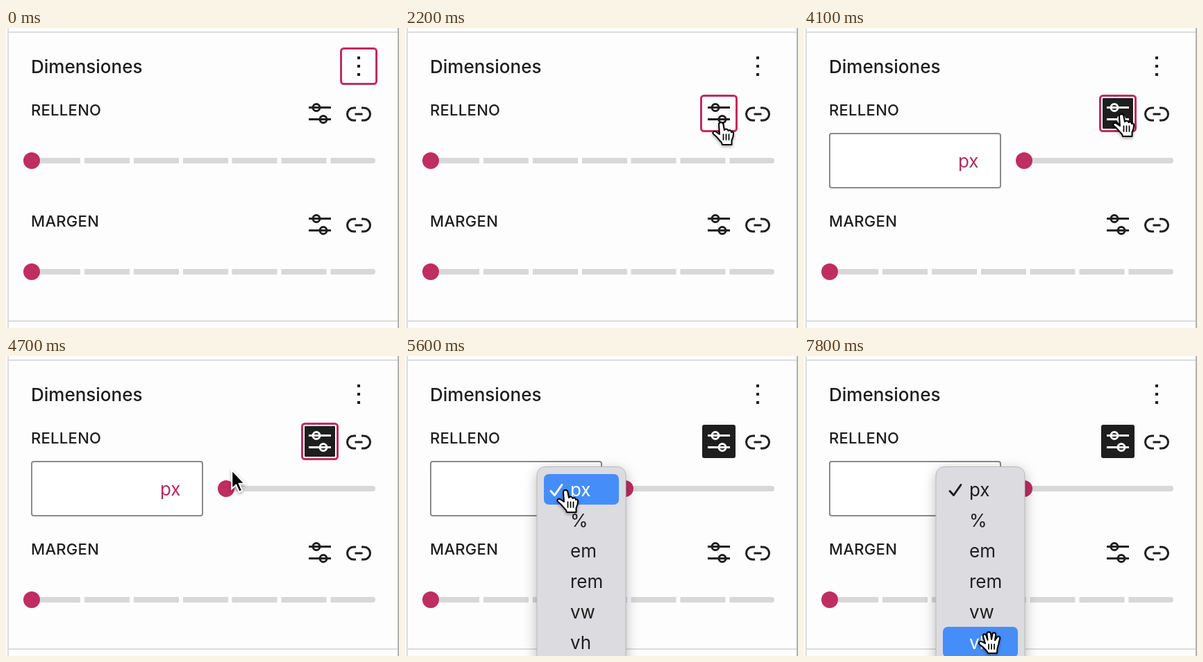
Write an HTML page that moves like this. It is 566 px wide and 432 px high and loops after 8000 ms.

```html
<!DOCTYPE html>
<html lang="es">
<head>
<meta charset="utf-8">
<title>Dimensiones</title>
<style>
  html, body { margin: 0; width: 100%; height: 100%; overflow: hidden; background: #fdfdfd; }
  svg { display: block; width: 566px; height: 432px; }
  text { font: 400 26px Inter, "Noto Sans", sans-serif; fill: #1e1e1e; }
  .title { font-weight: 500; }
  .label { font-size: 22px; font-weight: 500; letter-spacing: .3px; }
  .unit { fill: #b62b60; }
  .accent { fill: #bf2d61; }
  .ring { fill: #fff; stroke: #bf2d61; stroke-width: 3; }
  .track { fill: none; stroke: #d8d8d8; stroke-width: 8; }
  .icon { fill: none; stroke: #1e1e1e; stroke-width: 3; }
  .icon circle { fill: #1e1e1e; stroke: none; }
  .icon.on { stroke: #fff; }
  .icon.on circle { fill: #fff; }
  .panel { filter: drop-shadow(0 5px 9px rgba(0, 0, 0, .28)); }
  .row rect { fill: none; }
  .row path { fill: none; stroke: #1e1e1e; stroke-width: 3; stroke-linecap: round; stroke-linejoin: round; }
  .row.hot rect { fill: #458ef9; }
  .row.hot text { fill: #fff; }
  .row.hot path { stroke: #fff; }
  #cursor { filter: drop-shadow(0 2px 2px rgba(0, 0, 0, .35)); }
  .hand { fill: #fff; stroke: #000; stroke-width: 2; stroke-linejoin: round; stroke-linecap: round; }
</style>
</head>
<body>
<svg viewBox="0 0 566 432">
  <defs>
    <g id="sliders">
      <path d="M436 114.5h32M436 131.5h32"/>
      <circle cx="447" cy="114.5" r="5"/>
      <circle cx="457" cy="131.5" r="5"/>
    </g>
    <path id="link" d="M504 115h-3.5a9 9 0 0 0 0 18h3.5M512 115h3.5a9 9 0 0 1 0 18h-3.5M502.500 124h11"/>
    <g id="stepped">
      <path class="track" d="M37 191H528" stroke-dasharray="70 6 65 6 65 6 65 5.500 65 6 65 6 99"/>
      <circle cx="528" cy="191" r="4" fill="#d8d8d8"/>
      <circle class="accent" cx="37" cy="191" r="12"/>
    </g>
  </defs>

  <rect width="566" height="432" fill="#fdfdfd"/>
  <path d="M3 0V432M3 6H564M3 422H564" stroke="#dcdcdc" stroke-width="2"/>
  <path d="M565 0V432" stroke="#b0b0b0" stroke-width="2"/>

  <text class="title" x="36" y="65">Dimensiones</text>
  <rect id="dotsRing" class="ring" x="482.500" y="29.500" width="51" height="51" rx="4"/>
  <path d="M506 41h4v4h-4zM506 53h4v4h-4zM506 65h4v4h-4z" fill="#1e1e1e"/>

  <text class="label" x="36" y="126">RELLENO</text>
  <g id="toggle">
    <rect id="toggleOn" x="428" y="99" width="48" height="48" rx="3" fill="#1e1e1e"/>
    <g id="toggleRing">
      <rect class="ring" x="426.500" y="97.500" width="51" height="51" rx="4"/>
      <rect id="toggleCore" x="430" y="101" width="44" height="44" rx="1" fill="#1e1e1e"/>
    </g>
    <g id="toggleIcon" class="icon"><use href="#sliders"/></g>
  </g>
  <use class="icon" href="#link"/>

  <use id="preset" href="#stepped"/>
  <g id="custom">
    <rect x="37" y="152" width="246" height="78" rx="3" fill="#fff" stroke="#8a8a8a" stroke-width="2"/>
    <rect id="unitRing" x="206" y="168" width="61" height="46" rx="2" fill="none" stroke="#b62b60" stroke-width="2"/>
    <text class="unit" x="222" y="201">px</text>
    <path class="track" d="M317 191H528" stroke-linecap="round"/>
    <circle class="accent" cx="317" cy="191" r="12"/>
  </g>

  <text class="label" x="36" y="286">MARGEN</text>
  <g transform="translate(0 160)">
    <g class="icon"><use href="#sliders"/></g>
    <use class="icon" href="#link"/>
    <use href="#stepped"/>
  </g>

  <g id="menu">
    <rect class="panel" x="190" y="159.500" width="128" height="330" rx="12" fill="#dcdbe0" stroke="#b9b8bd"/>
  </g>

  <g id="cursor">
    <path id="arrow" d="M0 0V27L6 21.500 10.500 31.500 15 29.500 10.500 19.500H18.500Z" fill="#000" stroke="#fff" stroke-width="2"/>
    <g id="point" class="hand">
      <path d="M-3 3C-3-1 3-1 3.500 3L5 11C6 9 10 9 10.500 12 12 10.500 15 11 15 14 17 13 18.500 14 18 17 18 21 17 23 15.500 26V32H2L1 29C-3 25-6 20-10.500 17-13 14.500-10.500 11.500-7 13.500L-2 17Z"/>
      <path d="M3.500 17v8M7.500 17v8M11.500 17v8" stroke-width="1.700"/>
    </g>
    <g id="open" class="hand">
      <path d="M-5 17L-8 7C-9 3-5 2-3.500 6L-1.500 12-2.500 4C-3 0 2-1 3 3L4 11 5.500 3.500C6 0 10.500 1 10 5L9 12.500 12 8C14 5 17 7.500 16 10.500 14.500 15 14 20 12.500 24L12 31H-1C-2 27-6 25-9 21.500L-13 18.500C-16 15.500-12.500 13-9.500 14.500Z"/>
      <path d="M0 18v7M4 18v7M8 18v7" stroke-width="1.700"/>
    </g>
  </g>
</svg>
<script>
const LOOP = 8000, STEP = 100, ROW = 44, MENU_TOP = 170;
const $ = id => document.getElementById(id);
const show = (id, on) => $(id).style.display = on ? '' : 'none';

// Pointer stops: time, x, y
const path = [
  [900, 496, 254], [1400, 444, 157], [1700, 455, 136],
  [3000, 455, 136], [3300, 457, 124],
  [4200, 457, 124], [5100, 231, 193],
  [6100, 231, 193], [6300, 252, 327], [6600, 266, 410], [6700, 272, 431], [6900, 273, 440],
  [7500, 273, 440], [7800, 266, 397]
];

const rows = ['px', '%', 'em', 'rem', 'vw', 'vh'].map((unit, i) => {
  const y = MENU_TOP + i * ROW;
  $('menu').insertAdjacentHTML('beforeend',
    `<g class="row"><rect x="200" y="${y}" width="108" height="${ROW}" rx="7"/>
     <text x="238" y="${y + 32}">${unit}</text>
     ${i ? '' : '<path d="M210 194.500l5.500 6 10.500-15"/>'}</g>`);
  return $('menu').lastElementChild;
});

function pointerAt(t) {
  const i = path.findIndex(p => p[0] > t);
  if (i < 1) return (i ? path[path.length - 1] : path[0]).slice(1);
  const [t0, x0, y0] = path[i - 1], [t1, x1, y1] = path[i];
  let k = (t - t0) / (t1 - t0);
  if (t1 - t0 > 400) k = k * k * (3 - 2 * k);
  return [x0 + (x1 - x0) * k, y0 + (y1 - y0) * k];
}

function draw(t) {
  const [x, y] = pointerAt(t);
  const custom = t >= 2300, menu = t >= 5500;
  const onToggle = x > 428 && x < 476 && y > 99 && y < 147;
  const onUnit = custom && x < 268 && y > 167 && y < 215;
  const grab = t >= 6200, point = !grab && (onToggle || onUnit);

  show('dotsRing', t < 2200);
  show('toggleRing', t >= 2200 && !menu);
  show('toggleOn', custom);
  show('toggleCore', custom);
  $('toggleIcon').classList.toggle('on', custom);
  show('preset', !custom);
  show('custom', custom);
  show('unitRing', onUnit && !menu);
  show('menu', menu);
  const hot = Math.floor((y + 5 - MENU_TOP) / ROW);
  rows.forEach((row, i) => row.classList.toggle('hot', i === hot));

  show('cursor', t >= 900);
  show('arrow', !grab && !point);
  show('point', point);
  show('open', grab);
  $('cursor').setAttribute('transform', `translate(${x} ${y})`);
}

const start = performance.now();
function tick() {
  const t = (performance.now() - start) % LOOP;
  draw(Math.floor(t / STEP) * STEP);
  requestAnimationFrame(tick);
}
tick();
</script>
</body>
</html>
```
